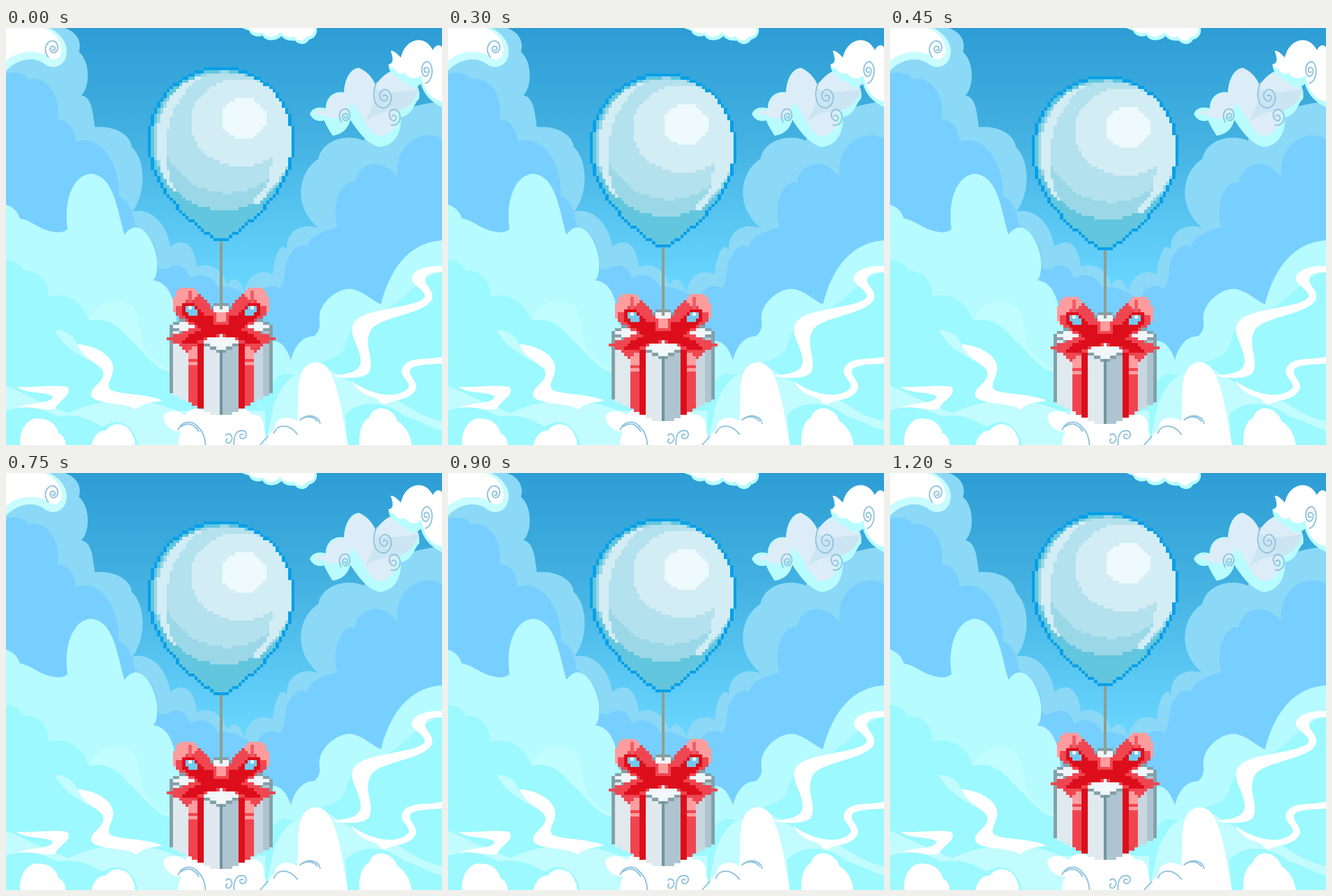
Recreate the animation shown at these times as an HTML page with a canvas. Size 765x732 px, loop 1350 ms.

```html
<!DOCTYPE html>
<html lang="en">
<head>
<meta charset="utf-8">
<title>Balloon gift</title>
<style>
html, body { margin: 0; width: 100%; height: 100%; overflow: hidden; }
svg, canvas { position: absolute; left: 0; top: 0; }
#gift {
  left: 249px; top: 69px; width: 257px; height: 610px;
  image-rendering: pixelated;
  animation: bob 1350ms step-end infinite;
}
@keyframes bob {
  0% { transform: translateY(0); }
  11.111% { transform: translateY(5px); }
  22.222% { transform: translateY(11px); }
  33.333% { transform: translateY(16px); }
  44.444% { transform: translateY(22px); }
  55.555% { transform: translateY(16px); }
  66.666% { transform: translateY(11px); }
  77.777% { transform: translateY(5px); }
  88.888%, 100% { transform: translateY(0); }
}
.curl { fill: none; stroke: #93c5df; stroke-width: 2.4; stroke-linecap: round; }
</style>
</head>
<body>
<svg width="765" height="732" viewBox="0 0 765 732">
  <defs>
    <linearGradient id="sky" x1="0" y1="0" x2="0" y2="1">
      <stop offset="0" stop-color="#2d9dd5"/>
      <stop offset=".25" stop-color="#42b0e0"/>
      <stop offset=".62" stop-color="#69d6ff"/>
    </linearGradient>
  </defs>
  <path fill="url(#sky)" d="M0 0H765V732H0Z"/>

  <!-- far cloud banks -->
  <path fill="#8bd9f6" d="M0 0H103C122 6 134 22 128 42C149 60 147 105 132 118C152 122 152 150 156 174C205 170 222 200 220 208C246 232 246 290 222 322C255 315 283 345 288 384C318 362 332 390 335 420C352 410 380 420 388 452C400 430 412 445 418 464C425 425 455 425 468 433C472 390 485 375 493 390C490 360 515 340 548 351C500 310 515 250 548 230C555 195 600 185 628 198C640 160 720 130 765 130V732H0Z"/>
  <path fill="#77cfff" d="M0 80C20 75 38 82 38 90C75 82 98 125 90 160C110 160 122 180 122 200C160 185 200 230 198 295C215 300 225 325 225 345C250 360 265 380 265 400C264 425 270 425 284 422C300 410 320 420 322 440C345 425 365 440 372 455C400 450 425 470 440 478C445 450 470 450 481 457C490 445 488 430 492 410C505 380 520 378 528 385C530 365 560 355 581 350C570 305 590 265 612 271C618 235 660 225 687 262C680 200 735 175 765 195V732H0Z"/>
  <!-- near banks -->
  <path fill="#b6fbff" d="M0 310C15 315 22 325 24 334C45 338 60 354 80 357C92 360 101 359 108 353C100 300 120 256 150 256C190 260 195 320 208 363C235 325 265 380 265 412C266 430 262 440 258 443C285 445 297 475 300 520L460 550C480 545 492 560 500 583C505 560 520 540 540 541C548 535 552 525 550 515C545 480 590 450 613 460C630 465 645 480 658 485C680 400 725 375 765 373V732H0Z"/>
  <path fill="#c0fdff" d="M146 515C158 480 195 470 222 489C240 510 230 560 258 580C275 598 290 595 300 600V732H146Z"/>
  <path fill="#9bf9ff" d="M0 407C15 408 28 417 31 426C62 425 76 450 74 472C105 463 135 480 146 515C175 505 200 525 215 545C235 560 250 585 275 600L300 608L470 620C490 595 500 615 515 608C540 580 580 590 595 560C605 510 635 515 655 495C690 495 715 440 765 428V732H0Z"/>
  <path fill="#c2fcff" d="M85 530C108 530 122 543 125 557C137 566 145 576 146 585C128 571 104 564 85 530ZM0 628C30 640 55 655 110 676C160 650 240 645 300 672H455V732H0ZM470 660C485 625 500 610 520 605L570 600C620 635 660 645 690 655C720 675 740 685 765 690V732H455Z"/>
  <path fill="#9bf9ff" d="M0 672C40 658 70 672 90 682C130 676 150 690 170 700C200 680 225 700 232 732H0ZM595 680C620 650 670 655 700 682C730 690 750 705 765 706V732H600Z"/>

  <!-- wisps and front clouds -->
  <g fill="#fff">
    <path d="M125 555C150 556 184 570 188 594C190 612 174 624 183 635C205 645 240 640 275 654C255 658 240 658 228 670C215 657 160 662 150 647C145 630 172 624 171 606C170 590 140 588 125 555Z"/>
    <path d="M18 630C45 632 85 625 108 630C118 645 90 655 87 668C67 674 41 661 19 668C38 655 78 662 82 647C72 638 38 643 18 630Z"/>
    <path d="M765 418C738 416 712 426 712 440C713 452 736 460 735 472C722 492 635 490 613 514C597 533 618 553 622 580C626 607 592 608 570 610C592 616 625 617 637 605C648 578 625 558 641 529C658 506 733 503 747 477C753 458 732 453 736 438C742 428 753 429 765 429Z"/>
    <path d="M765 577C738 584 705 575 695 598C690 613 714 623 705 633C680 656 630 638 606 619C617 639 634 646 650 650C655 655 658 660 665 661C679 651 713 655 720 631C719 615 702 608 711 597C728 589 748 591 765 589Z"/>
    <path d="M25 732C22 706 39 680 61 686C79 686 91 701 92 711C101 715 105 724 105 732ZM150 732C153 716 165 705 175 707C190 686 217 697 222 715C226 721 227 728 226 732Z"/>
    <path d="M302 732C302 718 306 712 308 708C285 711 270 684 279 677C291 669 305 672 314 680C321 666 342 665 350 674C365 662 385 670 390 681C402 662 424 664 430 679C445 676 455 689 452 704C458 715 457 724 455 732Z"/>
    <path d="M456 732C459 709 469 711 472 699C475 680 502 682 511 690C515 658 507 612 526 594C543 579 565 588 573 613C587 645 593 697 600 732ZM620 732C619 708 625 690 637 684C645 658 679 665 687 690C703 700 710 717 712 732Z"/>
  </g>
  <g class="curl">
    <path d="M302 705C310 688 329 688 338 702C346 709 349 720 350 732M307 700C320 691 330 695 338 708"/>
    <path d="M386 715C391 708 400 717 395 725C390 734 382 725 388 721M400 732C399 713 406 705 417 707C426 710 421 724 412 720C408 716 412 711 416 714M446 732L459 717"/>
    <path d="M470 711C476 695 497 694 511 713M516 688C532 674 550 683 551 694M519 686C531 679 541 684 546 690"/>
  </g>

  <!-- top left -->
  <path fill="#c9fcff" d="M0 0H76C98 10 110 31 106 47C103 67 84 73 70 65C49 47 19 55 0 75Z"/>
  <path fill="#fff" d="M0 0H66C84 7 96 20 98 38C96 56 83 60 73 50C53 37 20 40 0 58Z"/>
  <path class="curl" d="M74 51C63 36 73 20 84 23C95 27 92 46 81 43C74 38 79 29 85 33C88 38 84 41 81 38"/>
  <!-- top middle -->
  <path fill="#b8fcff" d="M414 0H545C548 12 538 20 532 20C526 32 512 29 507 22C495 23 488 20 483 14C477 23 455 25 450 13C440 18 428 12 427 5Z"/>
  <path fill="#fff" d="M424 0H541C543 8 537 16 528 15C520 27 509 21 504 14C496 20 486 13 481 7C473 18 457 18 451 8C441 11 431 7 424 0Z"/>
  <!-- top right -->
  <path fill="#b8fcff" d="M533 151C538 139 550 138 561 141C561 121 576 110 593 113C594 90 604 71 619 70C634 76 646 91 648 101C661 82 679 69 691 78C714 85 728 101 725 124C715 132 716 151 693 157C694 182 683 207 655 209C632 202 618 182 604 161C602 174 591 187 573 189C568 181 562 172 558 162C550 165 539 163 533 151Z"/>
  <path fill="#dcedf8" d="M538 149C546 143 554 148 563 142C562 122 579 113 593 114C596 90 605 72 619 70C634 76 646 91 648 101C661 82 679 69 691 78C713 86 724 98 720 119C710 135 700 144 686 147C689 174 671 190 653 190C628 178 624 142 605 131C604 150 589 159 579 159C565 160 558 151 538 149Z"/>
  <path fill="#cce5f3" d="M647 105C660 116 690 113 724 107C717 136 698 143 685 146C661 144 639 158 630 164C641 143 650 127 647 105Z"/>
  <path fill="#b8fcff" d="M675 40C683 40 687 47 693 52C700 25 730 12 749 39C754 28 762 29 765 34V139C751 132 735 122 728 98C718 108 704 104 700 94C688 96 688 82 680 84C671 73 672 70 671 64C678 62 681 59 675 40Z"/>
  <path fill="#fff" d="M675 40C683 40 687 47 693 52C700 18 735 10 749 39C754 28 762 29 765 34V129C747 126 733 111 729 83C718 93 704 87 700 78C692 84 685 79 681 70C672 72 674 65 671 64C681 62 681 54 675 40Z"/>
  <g class="curl">
    <path d="M650 96C640 119 647 143 665 140C681 134 679 107 663 108C651 113 655 130 666 128C673 122 667 115 662 119"/>
    <path d="M588 165C580 149 590 139 599 143C608 151 602 167 592 161C587 153 595 147 599 152C600 158 596 160 594 156"/>
    <path d="M676 170C693 175 698 146 681 143C668 143 671 164 682 163C688 157 681 149 677 155"/>
    <path d="M736 97C748 95 753 66 740 59C726 60 727 85 737 85C746 80 743 66 735 70C732 74 735 80 739 77"/>
  </g>
</svg>
<canvas id="gift" width="47" height="112"></canvas>
<script>
const cols = 47, rows = 112, left = 249, top0 = 69;
const cw = 257 / cols, ch = 610 / rows, axis = 377.5;
const g = document.getElementById('gift').getContext('2d');

// Fill every cell whose centre lies in the path (stage coordinates).
function paint(color, d, flip = false, clip = () => true) {
  const path = new Path2D(d);
  g.fillStyle = color;
  for (let r = 0; r < rows; r++) for (let c = 0; c < cols; c++) {
    const x = left + (c + .5) * cw, y = top0 + (r + .5) * ch;
    if (g.isPointInPath(path, flip ? 2 * axis - x : x, y) && clip(x, y)) g.fillRect(c, r, 1, 1);
  }
}
function both(color, d) {
  paint(color, d);
  paint(color, d, true);
}
const ellipse = (x, y, rx, ry) =>
  `M${x - rx} ${y}A${rx} ${ry} 0 1 1 ${x + rx} ${y}A${rx} ${ry} 0 1 1 ${x - rx} ${y}Z`;
const rect = (x, y, w, h) => `M${x} ${y}h${w}v${h}h${-w}Z`;

// balloon
const body = 'M248.5 199C248.5 128 306 68.5 377.5 68.5C449 68.5 506.5 128 506.5 199C506.5 275 445 335 385 376H370C310 335 248.5 275 248.5 199Z';
const bodyPath = new Path2D(body);
const inner = (x, y) => [[cw, 0], [-cw, 0], [0, ch], [0, -ch]]
  .every(([dx, dy]) => g.isPointInPath(bodyPath, x + dx, y + dy));
const shade = (color, d) => paint(color, d, false, inner);

paint('#079fe8', body);
shade('#62c6de', body);
shade('#9bd8e7', ellipse(382, 198, 124, 121));
shade('#b3e1ed', ellipse(388, 184, 112, 106));
shade('#d3edf5', 'M350 82C300 90 265 140 265 200C265 240 278 272 300 292C286 265 281 240 282 205C283 150 308 107 350 82Z');
shade('#d3edf5', ellipse(412, 166, 88, 77));
shade('#d3edf5', 'M501 160V228L481 263L440 313L432 307L458 276L466 240V200Z');
shade('#eefafd', ellipse(417, 159, 39, 36));

// string and box
paint('#83a0a8', 'M287 520L377 480L468 520V640L390 679H364L287 640Z');
paint('#e0e9ee', 'M293 529L375 569V679H364L293 643Z');
paint('#aec4d0', 'M380 569L462 529V643L390 679H380Z');
paint('#c8d7df', 'M435 543L452 535V648L435 656Z');
paint('#eff5f8', 'M292 523L377 486L463 523L377 566Z');
paint('#71959d', rect(374.6, 566, 5.5, 113));
both('#ef4550', 'M320 548H347V669L320 658Z');
both('#dd0e1b', 'M336 552H347V669L336 664Z');
both('#ff9d9f', rect(320, 555, 16, 25));
both('#ff9d9f', rect(320, 585, 16, 6));
paint('#8f9e91', rect(374.6, 374, 5.5, 122));

// bow
both('#ef4651', 'M287 541L312 534L350 516H377.5V541L354 545L337 558H327L320 568L308 566L306 555L282 549Z');
both('#dd0e1b', 'M309 548L345 526L377 516V539L350 545L327 555H304Z');
both('#ef4651', 'M293 476L299 464L306 457H327L340 466L352 481L368 500L374 515L362 529L336 526L318 517L298 503Z');
both('#ff9c9e', 'M293 476L299 464L306 457H327L340 466L330 478L313 480L307 490H298V502L293 495Z');
both('#f05c65', rect(320, 459, 5.5, 24));
both('#dd0e1b', 'M309 484H330L345 500L366 512L372 531H346L326 516L309 502Z');
both('#72c9ef', 'M314 490L329 488L337 499L330 506L315 498Z');
both('#effafd', rect(319, 489, 9, 6));
paint('#dd0e1b', 'M355 510L366 503H389L400 510L396 537H359Z');
paint('#ef4651', rect(366, 498, 23, 22));
paint('#ff9c9e', rect(369, 501, 16, 12));
paint('#f3f7f9', 'M360 552L377.5 538L395 552L377.5 565Z');
</script>
</body>
</html>
```
